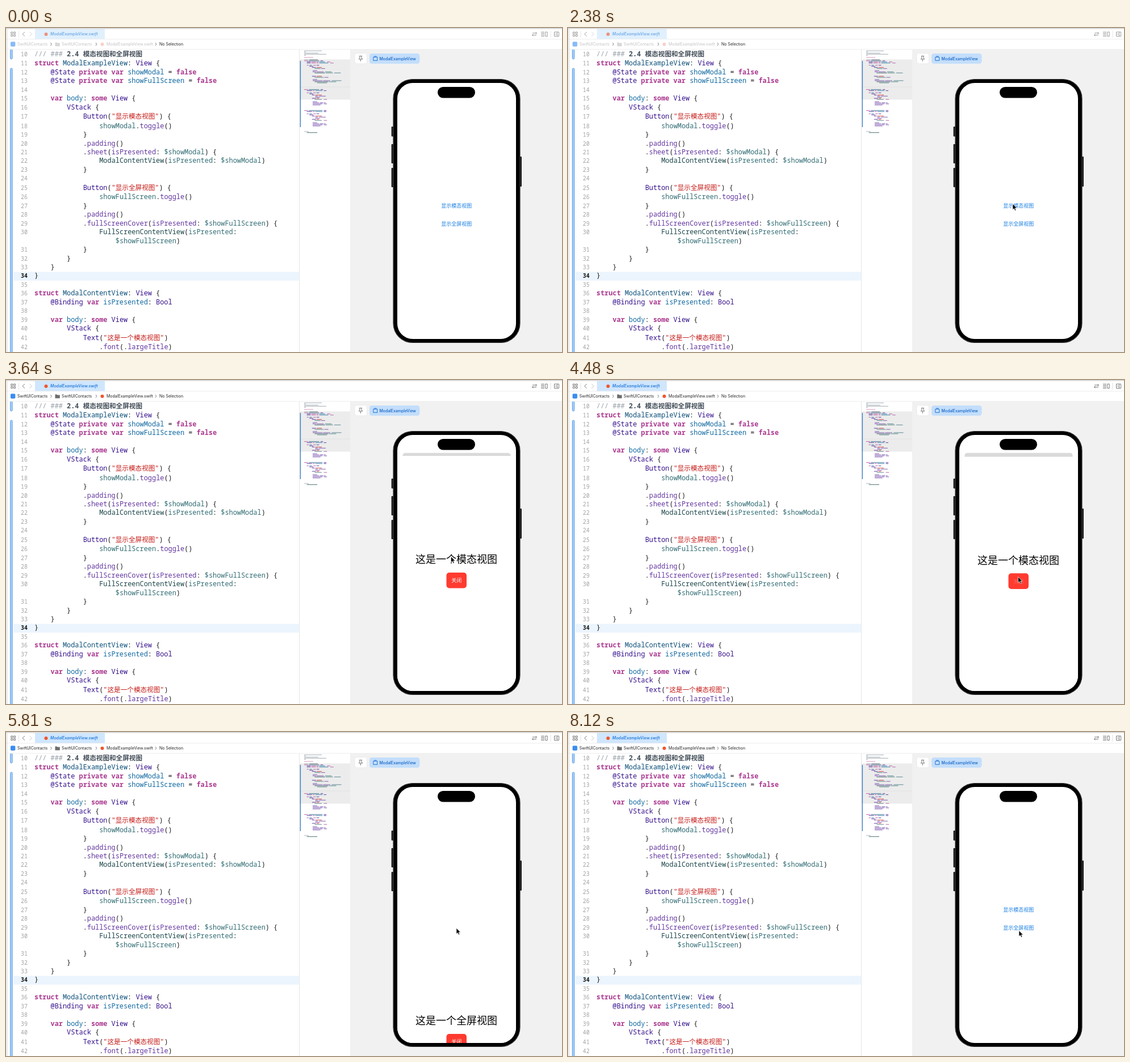
Recreate the animation shown at these times as an HTML page. Size 979 by 572 pixels, loop 8.26 s.

```html
<!DOCTYPE html>
<html lang="zh">
<head>
<meta charset="utf-8">
<title>Modal views</title>
<style>
html, body { margin: 0; width: 100%; height: 100%; overflow: hidden; background: #fff; }
svg { display: block; width: 979px; height: 572px; }
text { white-space: pre; font-family: Inter, "Noto Sans CJK SC", sans-serif; }
.code text { font: 500 11.9px "Noto Sans Mono", "Noto Sans CJK SC", monospace; fill: #1c1c1c; }
.code .num { font-size: 10px; font-weight: 400; fill: #a3a3a3; text-anchor: end; }
.code .now { font-weight: 700; fill: #111; }
.code .zh { font-family: "Noto Sans CJK SC", sans-serif; font-size: 11.6px; }
.c { fill: #98a1a9; }
.b { fill: #434e59; font-weight: 700; }
.s { fill: #c41a16; }
.k { fill: #ab3a90; font-weight: 700; }
.d { fill: #0b4f79; }
.v { fill: #0f68a0; }
.t { fill: #35118c; }
.f { fill: #6336a0; }
.m { fill: #1c464a; }
.p { fill: #326d74; }
.ui { font-size: 7px; fill: #222; }
.line { fill: none; stroke: #6e6e6e; stroke-width: .9; }
.tab { fill: #cfe6fd; }
.tabText { font-size: 7px; font-style: italic; font-weight: 500; fill: #1471d6; }
.idle .tab { fill: #e1f0fd; }
.idle .tabText, .idle .mark { opacity: .6; }
.idle .crumb { opacity: .27; }
.idle .tools { opacity: .75; }
.link { font-size: 9px; fill: #1a7fe0; text-anchor: middle; }
.title { font-size: 18px; fill: #000; text-anchor: middle; }
.close { font-size: 9px; fill: #fff; text-anchor: middle; }
</style>
</head>
<body>
<svg id="stage" class="idle" viewBox="0 0 979 572">
  <defs>
    <clipPath id="screen"><rect x="689" y="97" width="209" height="452" rx="27"/></clipPath>
  </defs>
  <rect width="979" height="572" fill="#fff"/>

  <!-- editor -->
  <rect x="13" y="430.5" width="503" height="15.5" fill="#ecf5fe"/>
  <g fill="#a6cdf8" stroke="#5b9fe8" stroke-width=".9">
    <rect x="7.6" y="30" width="3.6" height="25" rx="1.8"/>
    <rect x="7.6" y="71" width="3.6" height="520" rx="1.8"/>
  </g>
  <g id="code" class="code"></g>

  <!-- minimap -->
  <rect x="517" y="55.5" width="89" height="71" fill="#ececec"/>
  <path d="M517 104H606" stroke="#dedede" stroke-width=".8"/>
  <path d="M516.5 38V572" stroke="#e6e6e6"/>
  <path d="M518.4 58V175" stroke="#2f78c4" stroke-width="1.3"/>
  <g id="map" opacity=".7">
    <path d="M525 40.4h31M525 42.4h3M525 44.4h25M525 46.4h39M525 48.4h3" stroke="#98a1a9" stroke-width="1.1"/>
    <path d="M525 52h16" stroke="#c77ab4" stroke-width="1.1"/>
  </g>

  <!-- header -->
  <rect width="979" height="38" fill="#fff"/>
  <rect width="979" height="1.8" fill="#dadada"/>
  <path d="M0 19.8H979M0 37.7H979" stroke="#e8e8e8" stroke-width=".8"/>
  <rect class="tab" x="51" y="2" width="123" height="17.5"/>
  <circle class="mark" cx="70.5" cy="11" r="3" fill="#f0552f"/>
  <text class="tabText" x="78" y="13.3">ModalExampleView.swift</text>
  <g class="tools line">
    <path d="M8.8 7h2.9v2.9h-2.9zM13.6 7h2.9v2.9h-2.9zM8.8 11.7h2.9v2.9h-2.9zM13.6 11.7h2.9v2.9h-2.9z"/>
    <path d="M33 7l-4 3.8 4 3.8"/>
    <path d="M41.5 7l4 3.8-4 3.8" stroke="#bbb"/>
    <path d="M22.5 5V17M959 5V17" stroke="#ddd"/>
    <path d="M927 9h7.5M932.5 7l2 2-2 2M934 12.6h-7.5M928.5 10.8l-2 1.8 2 1.8"/>
    <path d="M942 7.2h6M942 9.6h6M942 12h6M942 14.4h6M949.8 7h3.4v7.6h-3.4z"/>
    <path d="M965.5 7h8v7.6h-8zM970.5 7v7.6M967 10.8h2.4"/>
  </g>
  <rect class="mark" x="8" y="24.3" width="8.4" height="8.4" rx="1.8" fill="#3a8df0"/>
  <g class="crumb">
    <text class="ui" x="20" y="31">SwiftUIContacts</text>
    <path d="M86.5 25.5h3l1 1h4.3v5.8h-8.3z" fill="#6d6d6d"/>
    <text class="ui" x="98" y="31">SwiftUIContacts</text>
    <circle cx="169.5" cy="28.8" r="3" fill="#f0552f"/>
    <text class="ui" x="177" y="31">ModalExampleView.swift</text>
  </g>
  <path class="line" d="M78.5 26l1.8 2.6-1.8 2.6M158 26l1.8 2.6-1.8 2.6M263 26l1.8 2.6-1.8 2.6"/>
  <text class="ui" x="270" y="31">No Selection</text>
  <path d="M1.6 0V572" stroke="#dadada" stroke-width="1.2"/>

  <!-- preview -->
  <rect x="606" y="38" width="373" height="534" fill="#f1f1f1"/>
  <rect x="614" y="44.5" width="21.5" height="18.5" rx="4" fill="#fff" stroke="#e2e2e2" stroke-width=".6"/>
  <path class="line" d="M622 49.5h5M622.9 49.5v3.5l-1.8 2h6.8l-1.8-2v-3.5M624.5 55v4" stroke="#333"/>
  <rect x="640" y="45" width="88.5" height="18" rx="4.5" fill="#c3defb"/>
  <path d="M646.8 51.4h7v6h-7zM648 50h4.6" fill="none" stroke="#1568c8" stroke-width=".9"/>
  <text class="ui" x="657.5" y="56.6" style="font-size:6.9px;font-weight:500;fill:#1062c4">ModalExampleView</text>

  <!-- phone -->
  <g fill="#1d1d1f">
    <rect x="678.6" y="174" width="5" height="17.5" rx="1"/>
    <rect x="678.6" y="205" width="5" height="34" rx="1"/>
    <rect x="678.6" y="247" width="5" height="34" rx="1"/>
    <rect x="903" y="227" width="5" height="53" rx="1"/>
  </g>
  <rect x="682" y="90.5" width="223" height="465" rx="34" fill="#000" stroke="#3b3b3d" stroke-width="1.2"/>
  <g clip-path="url(#screen)">
    <rect x="689" y="97" width="209" height="452" fill="#fff"/>
    <g id="home">
      <rect id="dim" x="689" y="97" width="209" height="452" rx="5"/>
      <text id="link" class="link" x="793.3" y="317.4">显示模态视图</text>
      <text class="link" x="793.3" y="349.2">显示全屏视图</text>
    </g>
    <g id="sheet"></g>
    <g id="cover"></g>
  </g>
  <rect x="760" y="104" width="66" height="19.5" rx="9.75" fill="#000"/>
  <path id="cursor" d="M0 0V10.4L2.4 8.2 4 11.9 5.8 11.1 4.2 7.5H7.4Z" fill="#000" stroke="#fff" stroke-width=".7"/>
</svg>

<script>
const $ = id => document.getElementById(id);

const contentView = (name, label) => `struct ${name}: View {
    @Binding var isPresented: Bool

    var body: some View {
        VStack {
            Text("${label}")
                .font(.largeTitle)
                .padding()
            Button("关闭") {
                isPresented = false
            }
            .padding()
            .background(Color.red)
            .foregroundColor(.white)
            .cornerRadius(10)
        }
    }
}
`;

const source = `/// ### 2.4 模态视图和全屏视图
struct ModalExampleView: View {
    @State private var showModal = false
    @State private var showFullScreen = false

    var body: some View {
        VStack {
            Button("显示模态视图") {
                showModal.toggle()
            }
            .padding()
            .sheet(isPresented: $showModal) {
                ModalContentView(isPresented: $showModal)
            }

            Button("显示全屏视图") {
                showFullScreen.toggle()
            }
            .padding()
            .fullScreenCover(isPresented: $showFullScreen) {
                FullScreenContentView(isPresented:
                    $showFullScreen)
            }
        }
    }
}

${contentView('ModalContentView', '这是一个模态视图')}
${contentView('FullScreenContentView', '这是一个全屏视图')}
/// ###
    ModalExampleView()`;

const kinds = {
  c: '///.*###',
  b: '(?<=### ).*',
  s: '"[^"]*"',
  k: '\\b(?:struct|var|some|private|false)\\b',
  d: '(?<=struct )\\w+',
  v: '(?<=var )\\w+',
  t: '@\\w+|\\b(?:View|VStack|Button|Text|Bool|Color)\\b',
  f: '(?<=\\.)[a-z]\\w+|(?<=sheet\\(|Cover\\()isPresented',
  m: '\\b\\w+(?:Content|Example)View',
  p: '\\$?\\b(?:show\\w+|isPresented)'
};
const token = new RegExp(Object.entries(kinds).map(([k, s]) => `(?<${k}>${s})`).join('|'), 'g');
const han = /[\u4e00-\u9fff]+/g;
const wrapHan = s => s.replace(han, z => `<tspan class="zh">${z}</tspan>`);

function buildCode() {
  let y = 29.5, num = 9, text = '', map = '';
  source.split('\n').forEach((line, i) => {
    const tall = line.search(han) >= 0;
    const indent = line.search(/\S|$/);
    const wrapped = line.trim()[0] === '$';
    y += 15.46 + (tall ? 1.1 : 0);
    let out = '', last = indent;
    for (const m of line.matchAll(token)) {
      const kind = Object.keys(kinds).find(k => m.groups[k] !== undefined);
      out += line.slice(last, m.index) + `<tspan class="${kind}">${wrapHan(m[0])}</tspan>`;
      last = m.index + m[0].length;
      map += `<rect class="${kind}" x="${525 + m.index * 1.15}" y="${55.4 + i * 1.95}" width="${m[0].length * 1.15}" height="1.1"/>`;
    }
    out += line.slice(last);
    if (!wrapped) num++;
    if (y < 590) {
      const base = (y + 4).toFixed(2);
      if (!wrapped) text += `<text class="num${num === 34 ? ' now' : ''}" x="38" y="${base}">${num}</text>`;
      text += `<text x="${50 + indent * 7.14}" y="${base}">${out}</text>`;
    }
    y += tall ? .9 : 0;
  });
  $('code').innerHTML = text;
  $('map').innerHTML += map;
}

const page = (top, titleY, label) => `
  <rect x="689" y="${top}" width="209" height="470" rx="4" fill="#fff"/>
  <text class="title" x="793" y="${titleY + 6.7}">${label}</text>
  <rect x="775.5" y="${titleY + 23.4}" width="35.5" height="27.6" rx="5" fill="#ff3b30"/>
  <text class="close" x="793.3" y="${titleY + 40.6}">关闭</text>`;

buildCode();
$('sheet').innerHTML = page(134, 316.5, '这是一个模态视图');
$('cover').innerHTML = page(97, 314, '这是一个全屏视图');
const sheetLabel = $('sheet').querySelector('.close');
const coverLabel = $('cover').querySelector('.close');

const LOOP = 8260, STEP = 70;

// time, x, y of the pointer tip
const path = [
  [420, 790, 352], [840, 806, 322], [1260, 774, 317], [1680, 800, 340],
  [1750, 800, 340], [1960, 797, 332], [2030, 797, 332], [2380, 783, 310.5],
  [3570, 783, 310.5], [3710, 784, 313], [3780, 784, 313], [4200, 792.5, 347.5],
  [5110, 792.5, 347.5], [5180, 793.5, 346.5], [5320, 793, 346.2],
  [6440, 793, 346.2], [6720, 794, 350.5], [LOOP, 794, 350.5]
];

function pointer(t) {
  const i = Math.max(1, path.findIndex(k => k[0] >= t));
  const [t0, x0, y0] = path[i - 1], [t1, x1, y1] = path[i];
  const u = Math.min(1, Math.max(0, (t - t0) / (t1 - t0)));
  const e = u * u * (3 - 2 * u);
  return [x0 + (x1 - x0) * e, y0 + (y1 - y0) * e];
}

// critically damped spring from 0 to 1
function spring(ms) {
  const x = Math.max(0, ms) * .0173;
  return 1 - Math.exp(-x) * (1 + x);
}
const shown = (t, open, close) => t < close ? spring(t - open) : 1 - spring(t - close);
const between = (t, a, b) => t >= a && t < b;

function draw(t) {
  $('stage').classList.toggle('idle', t < 2870);

  const p = shown(t, 2940, 4475);
  $('home').setAttribute('transform',
    `translate(793.5 ${323 + 11.5 * p}) scale(${1 - .09 * p}) translate(-793.5 -323)`);
  $('dim').setAttribute('opacity', .145 * p * p);
  $('sheet').setAttribute('transform', `translate(0 ${(1 - p) * 415})`);
  $('link').setAttribute('opacity', between(t, 2870, 2940) ? .3 : 1);
  sheetLabel.setAttribute('opacity', between(t, 4410, 4900) ? .2 : 1);

  const q = shown(t, 5700, 7240);
  $('cover').setAttribute('transform', `translate(0 ${(1 - q) * 452})`);
  coverLabel.setAttribute('opacity', between(t, 7280, 7700) ? .2 : 1);

  const [x, y] = pointer(t);
  $('cursor').setAttribute('transform', `translate(${x} ${y})`);
  $('cursor').setAttribute('visibility', t < 490 ? 'hidden' : 'visible');
}

const start = performance.now();
function tick() {
  const t = (performance.now() - start) % LOOP;
  draw(Math.floor(t / STEP) * STEP);
  requestAnimationFrame(tick);
}
tick();
</script>
</body>
</html>
```
